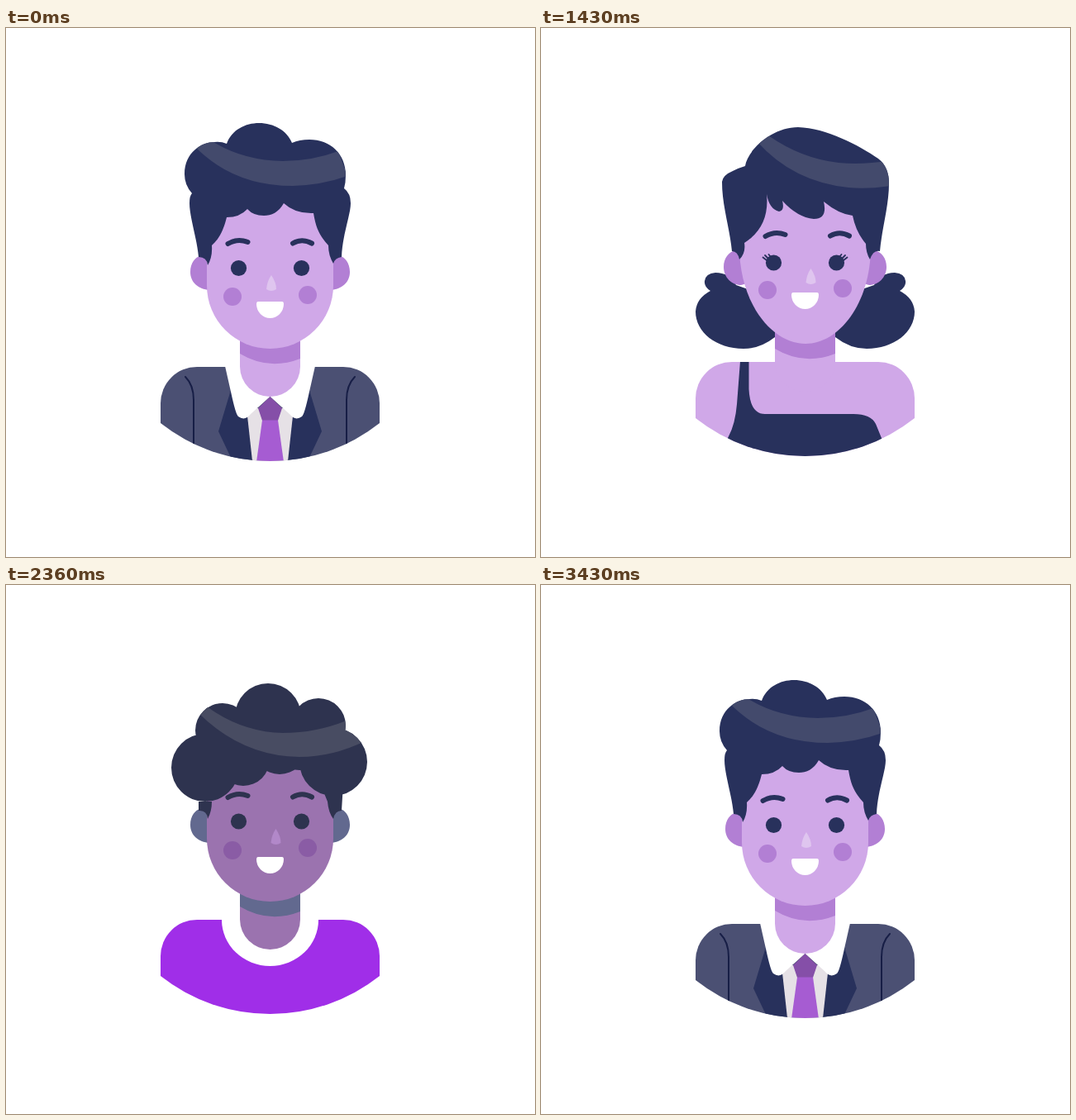
An HTML page that plays this animation: 640x640 px, repeating every 3.5 s.

```html
<!DOCTYPE html>
<html lang="en">
<head>
<meta charset="utf-8">
<title>Avatars</title>
<style>
html, body { margin: 0; width: 100%; height: 100%; overflow: hidden; background: #fff; }
svg { display: block; width: 100%; height: 100%; }
</style>
</head>
<body>
<svg id="stage" viewBox="0 0 640 640" xmlns="http://www.w3.org/2000/svg"></svg>
<script>
const LOOP = 3500, IN = 370, OUT = 325, LIFT = 106;
const stage = document.getElementById('stage');
let clipCount = 0;

const path = (d, fill) => `<path d="${d}" fill="${fill}"/>`;
const line = (d, color, width) =>
  `<path d="${d}" fill="none" stroke="${color}" stroke-width="${width}" stroke-linecap="round"/>`;
const circle = (x, y, r, fill) => `<circle cx="${x}" cy="${y}" r="${r}" fill="${fill}"/>`;
const move = (x, y, content) => `<g transform="translate(${x} ${y})">${content}</g>`;
const mirror = content => `<g transform="matrix(-1 0 0 1 639 0)">${content}</g>`;
const both = content => content + mirror(content);
// A filled shape with details clipped to its outline
const clipped = (d, fill, content) => {
  const id = 'clip' + clipCount++;
  return `<clipPath id="${id}"><path d="${d}"/></clipPath>` + path(d, fill) +
    `<g clip-path="url(#${id})">${content}</g>`;
};
const disc = (x, y, r) => `M${x - r} ${y}a${r} ${r} 0 1 0 ${2 * r} 0a${r} ${r} 0 1 0 ${-2 * r} 0Z`;

const TORSO = 'M187 478V454A44 44 0 0 1 231 410H408A44 44 0 0 1 452 454V478A214 214 0 0 1 187 478Z';
const PILL = 'M243 235.5A76.5 76.5 0 0 1 396 235.5V311.5A76.5 76.5 0 0 1 243 311.5Z';
const OVAL = 'M240 229.5A79.5 79.5 0 0 1 399 229.5V264C399 334 360 382 320 382S240 334 240 264Z';
const EAR = 'M236 276C229 276 223 285 223 295C223 308 233 316 246 317C243 308 243 298 243 284C243 279 240 276 236 276Z';
const ROUND_EAR = 'M238 276C229 277 223 286 223 296C223 309 233 318 244 318Q256 316 258 303Q249 303 248 292V282Q247 276 238 276Z';
const NECK = 'M283 336.5A36.5 36.5 0 0 1 356 336.5V409.5A36.5 36.5 0 0 1 283 409.5Z';
const NECK_SHADE = 'M283 345H356V400Q318 415 283 394Z';
const NOSE = 'M321 299Q327 308 327 316Q321 320 315 316Q316 306 321 299Z';
const MOUTH = 'M305 331H334Q336 331 336 334A16.5 17 0 0 1 303 334Q303 331 305 331Z';
const BROW_L = 'M268.5 261Q280 254 292.5 259';
const BROW_R = 'M347 260.5Q358 254 370 260.5';

const suit = clipped(TORSO, '#4b5073',
  both(path('M272 438L257 488L275 526H300L292 470Z', '#28315c') +
    line('M217 422Q227 432 227 450V510', '#171e46', 2)) +
  path('M291 460H348L341 524H298Z', '#e6e1e6') +
  path('M265 409L272 440Q278 468 281 470Q289 476 296 467L319.5 446L343 467Q350 476 358 470Q361 468 367 440L374 409Z', '#fff') +
  path('M319.5 446L334 460L329 475H310L305 460Z', '#854fa8') +
  path('M310 474.5H329L336 525H303Z', '#a65cd2'));
const dress = clipped(TORSO, '#d0a8e8',
  path('M241 409H251.5V443Q253 473 271 473H378Q399 473 405 485L416 512V524H215L227 500Q235 485 237 461Z', '#28315c'));
const shirt = clipped(TORSO, '#a02ee8', path('M261 410A58.5 56 0 0 0 378 410Z', '#fff'));

const shortHair = clipped(
  'M233 277C231 255 222 228 222 212Q222 203 225 200Q216 190 216 177C216 150 237 138 252 138Q260 137 267 140' +
  'C273 123 290 115 306 115C324 115 340 124 346 139Q355 135 367 135C392 135 411 152 411 178Q411 187 409 194' +
  'Q417 200 417 212C417 226 407 250 406 277Q398 278 396 285Q390 275 390 263C380 252 375 243 372 224' +
  'Q350 225 336 212C330 223 321 227 312 227Q299 227 292 219Q283 229 267 229C263 245 258 255 249 263' +
  'Q250 277 244 287Q243 277 233 277Z', '#28315c',
  path('M228 143Q275 191 347 191Q382 190 413 179L402 149Q370 161 335 161Q285 160 248 136Z', '#434a6c'));
const sweptHair = clipped(
  'M231 270C228 240 219 215 219 186Q220 178 232 173Q240 169 247 167C250 147 280 120 311 120' +
  'C345 121 385 142 408 158Q421 168 421 188C421 215 412 245 410 270Q402 268 398 280Q393 272 393 261' +
  'Q381 247 377 227Q360 225 342 210Q347 231 330 231Q310 229 292 209Q295 221 288 222Q276 219 273 201' +
  'Q277 240 246 260Q248 272 240 280Q238 270 231 270Z', '#28315c',
  path('M262 138Q305 186 372 193Q395 195 422 191V160Q390 166 360 163Q315 158 275 130Z', '#434a6c'));
const curlyHair = clipped(
  disc(317, 159, 40) + disc(262, 176, 33) + disc(378, 170, 33) + disc(241, 221, 41) + disc(396, 214, 41) +
  disc(287, 211, 32) + disc(331, 197, 32) + disc(355, 197, 27) +
  'M233 240V273Q243 272 244 283Q249 274 249 262L265 240Z' +
  'M380 240L389 262Q390 275 396 283Q398 273 406 273L408 240Z', '#2e334f',
  path('M232 154Q285 207 355 208Q395 208 434 189L412 164Q375 179 335 179Q285 178 243 147Z', '#484c62'));

const buns = both(path('M283 374Q265 388 245 388C212 388 187 368 187 343Q188 327 205 318' +
  'Q197 313 198 306Q199 297 211 296Q228 296 236 311L262 320L300 360Z', '#28315c'));
const lashes = 'M273 281L268.5 277.5M275 279L271 275M278 277L275.5 274';

const man = {
  skin: '#d0a8e8', shade: '#b27fd4', ink: '#28315c', noseColor: '#dfc5ef',
  rise: 104, dy: 0, face: path(PILL, '#d0a8e8'), ear: EAR, body: suit, hair: shortHair,
  cheekY: [325, 323], nose: [0, 0], brow: [0, 0], eyeY: 290.5, mouthY: 0,
  enter: { body: 2767, neck: 2785, earL: 2798, earR: 2812, face: 2848, cheekL: 2944, cheekR: 2897,
    nose: 3020, hair: 3011, browL: 2987, browR: 2998, eyeL: 3030, eyeR: 3040, mouth: 3050 },
  leave: { body: 345, neck: 352, earL: 370, earR: 380, face: 400, cheekL: 470, cheekR: 460,
    nose: 479, hair: 515, browL: 487, browR: 495, eyeL: 545, eyeR: 575, mouth: 598 }
};
const woman = {
  ...man, rise: 126, dy: -6, face: path(OVAL, '#d0a8e8'), ear: ROUND_EAR, body: dress, hair: sweptHair, buns, lashes,
  cheekY: [317, 315], nose: [5.5, -8], brow: [3, -9], eyeY: 284, mouthY: -11,
  enter: { buns: 446, body: 446, neck: 455, earL: 498, earR: 485, face: 521, cheekL: 575, cheekR: 541,
    nose: 757, hair: 710, browL: 630, browR: 664, eyeL: 755, eyeR: 760, mouth: 770 },
  leave: { buns: 1425, body: 1420, neck: 1425, earL: 1450, earR: 1460, face: 1500, cheekL: 1680, cheekR: 1690,
    nose: 1706, hair: 1649, browL: 1640, browR: 1650, eyeL: 1719, eyeR: 1713, mouth: 1731 }
};
const curly = {
  ...man, skin: '#9b73af', shade: '#62698f', ink: '#2e334f', noseColor: '#b288c9', cheek: '#8a5ca5',
  rise: 126, dy: -5, face: move(0, -5, path(PILL, '#9b73af')), body: shirt, hair: curlyHair,
  cheekY: [321, 318], nose: [5.5, -4], brow: [0, -4], eyeY: 286, mouthY: -2,
  enter: { body: 1661, neck: 1668, earL: 1680, earR: 1693, face: 1706, cheekL: 1731, cheekR: 1719,
    nose: 1778, hair: 1880, browL: 1808, browR: 1858, eyeL: 1911, eyeR: 1928, mouth: 1950 },
  leave: { body: 2650, neck: 2654, earL: 2680, earR: 2688, face: 2720, cheekL: 2780, cheekR: 2744,
    nose: 2792, hair: 2855, browL: 2802, browR: 2826, eyeL: 2881, eyeR: 2901, mouth: 2915 }
};

function build(c) {
  const ear = move(c === woman ? -2 : 0, c === woman ? -7 : c.dy, path(c.ear, c.shade));
  const lash = c.lashes ? line(c.lashes, c.ink, 1.8) : '';
  const cheek = c.cheek || c.shade;
  const parts = {
    buns: c.buns,
    body: move(0, c.dy, c.body),
    neck: move(0, c.dy, clipped(NECK, c.skin, path(NECK_SHADE, c.shade))),
    earL: ear,
    earR: mirror(ear),
    face: c.face,
    cheekL: circle(274, c.cheekY[0], 11, cheek),
    cheekR: circle(365, c.cheekY[1], 11, cheek),
    nose: move(...c.nose, path(NOSE, c.noseColor)),
    hair: c.hair,
    browL: move(...c.brow, line(BROW_L, c.ink, 6)),
    browR: move(...c.brow, line(BROW_R, c.ink, 6)),
    eyeL: circle(281.5, c.eyeY, 9.6, c.ink) + lash,
    eyeR: circle(357.5, c.eyeY, 9.6, c.ink) + mirror(lash),
    mouth: move(0, c.mouthY, path(MOUTH, '#fff'))
  };
  const names = Object.keys(parts).filter(name => parts[name]);
  stage.insertAdjacentHTML('beforeend', `<g>${names.map(n => `<g><g>${parts[n]}</g></g>`).join('')}</g>`);
  c.root = stage.lastElementChild;
  c.parts = names.map((name, i) => {
    const node = c.root.children[i];
    const box = node.firstElementChild.getBBox();
    return {
      node, start: c.enter[name],
      stay: (c.leave[name] - c.enter[name] + LOOP) % LOOP,
      x: box.x + box.width / 2, y: box.y + box.height / 2
    };
  });
}

const clamp = v => Math.max(0, Math.min(1, v));

function pose(c, time) {
  for (const { node, start, stay, x, y } of c.parts) {
    const age = (time - start + LOOP) % LOOP;
    const u = clamp(age / IN), scale = u * u * (3 - 2 * u);
    const exit = clamp((age - stay) / OUT);
    const shown = scale > 0.002 && exit < 1;
    node.style.display = shown ? '' : 'none';
    if (!shown) continue;
    const dy = c.rise * (1 - scale) - LIFT * exit ** 3;
    node.setAttribute('transform', `translate(${x} ${y + dy}) scale(${scale}) translate(${-x} ${-y})`);
    node.setAttribute('opacity', 1 - exit ** 2.6);
  }
}

const cast = [man, woman, curly];
cast.forEach(build);

function frame(now) {
  const time = now % LOOP;
  // The arriving character always sits beneath the leaving one
  const arriving = time < 1300 ? woman : time < 2550 ? curly : man;
  if (stage.firstElementChild !== arriving.root) stage.prepend(arriving.root);
  cast.forEach(c => pose(c, time));
  requestAnimationFrame(frame);
}
frame(0);
</script>
</body>
</html>
```
